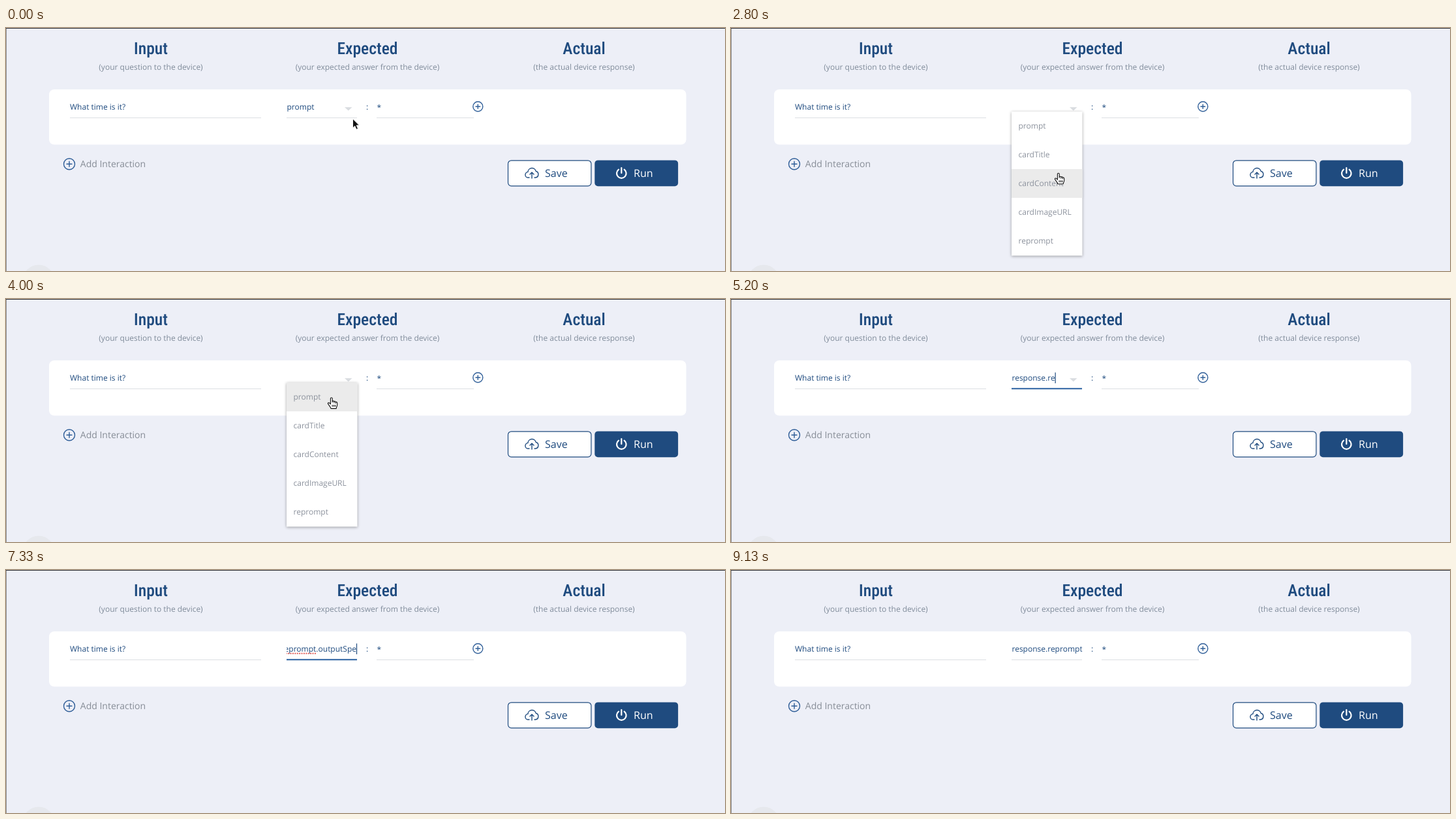
Recreate the animation shown at these times as an HTML page. Size 1102 by 372 pixels, loop 10 s.

```html
<!DOCTYPE html>
<html lang="en">
<head>
<meta charset="utf-8">
<style>
  html, body { margin: 0; height: 100%; overflow: hidden; background: #edeff7; }
  svg { display: block; font: 12px "Open Sans", "Noto Sans", sans-serif; fill: #1f4b7f; text-rendering: geometricPrecision; }
  .head {
    font: 500 25.5px "Noto Sans ExtraCondensed", "Roboto Condensed", "Liberation Sans Narrow", "Noto Sans", sans-serif;
    font-stretch: extra-condensed;
  }
  .mid { text-anchor: middle; }
  .grey { fill: #808c9b; }
  .icon { fill: none; stroke: #1f4b7f; stroke-width: 1.4; stroke-linecap: round; stroke-linejoin: round; }
  .plus { stroke: #2f5e98; }
  .rule { stroke: #dcdfe3; }
  #panel { filter: drop-shadow(0 1px 2px rgba(0, 0, 0, .36)); }
  #options { fill: #8c929d; }
</style>
</head>
<body>
<svg width="1102" height="372" viewBox="0 0 1102 372">
  <defs><clipPath id="field"><path d="M430 108h108.5v30H430z"/></clipPath></defs>
  <path fill="#8b8d93" d="M0 0h1v372H0z"/>
  <path fill="#303238" d="M0 0h1102v1H0z"/>
  <circle cx="50" cy="386.5" r="24" fill="#e6e8ed"/>

  <g class="mid">
    <g class="head"><text x="222" y="40">Input</text><text x="554" y="40">Expected</text><text x="886" y="40">Actual</text></g>
    <g class="grey">
      <text x="222" y="64">(your question to the device)</text>
      <text x="554" y="64">(your expected answer from the device)</text>
      <text x="886" y="64">(the actual device response)</text>
    </g>
  </g>

  <rect x="66" y="94" width="976.5" height="84.5" rx="8" fill="#fff"/>
  <path class="rule" d="M98 137.5H391M430 137.5H538M568 137.5H717"/>
  <text x="98" y="125">What time is it?</text>
  <text x="552" y="125">:</text>
  <text x="568.5" y="126">*</text>
  <path class="icon plus" d="M715.8 120.3a7.5 7.5 0 1 0 15 0a7.5 7.5 0 1 0-15 0M720 120.3h6.6M723.3 117v6.6"/>

  <path class="icon plus" d="M88.5 208.3a8.5 8.5 0 1 0 17 0a8.5 8.5 0 1 0-17 0M93 208.3h8M97 204.3v8"/>
  <text x="113.8" y="213.2" font-size="14" fill="#878d97">Add Interaction</text>

  <rect x="769.5" y="202.8" width="127.4" height="39" rx="5" fill="#fff" stroke="#1f4b7f" stroke-width="1.2"/>
  <path class="icon" d="M802 229h-1.5a4.3 4.3 0 0 1-.6-8.6a6.2 6.2 0 0 1 12.2-1.2a5 5 0 0 1-.6 9.8H810M806 230v-8.6M803 224l3-3 3 3"/>
  <text x="826" y="228.4" font-size="16">Save</text>
  <rect x="902.3" y="202.4" width="127.8" height="39.8" rx="5"/>
  <path fill="none" stroke="#fff" stroke-width="2.2" stroke-linecap="round" d="M939 216.6a7.3 7.3 0 1 0 8.6 0M943.3 214v8"/>
  <text x="962" y="228.4" font-size="16" fill="#fff">Run</text>

  <path id="arrow" fill="#d9dce0" d="M519 121.3h11.5l-5.75 5.2z"/>
  <g clip-path="url(#field)">
    <text id="value" y="125"></text>
    <path id="spelling" fill="none" stroke="#e2615c" stroke-width="2" stroke-dasharray="2 1.4"/>
  </g>
  <path id="focus" stroke="#2a60a0" stroke-width="2"/>
  <g id="panel">
    <rect id="sheet" x="430" y="128" width="108.5" fill="#fff"/>
    <rect id="hover" x="430" width="108.5" height="44" fill="#ebebeb"/>
    <g id="options"></g>
  </g>
  <path id="caret" fill="none" stroke="#1f4b7f" stroke-width="1.2"/>
  <path id="pointer" stroke-linejoin="round"/>
</svg>
<script>
const $ = id => document.getElementById(id);
const set = (id, attrs) => { for (const k in attrs) $(id).setAttribute(k, attrs[k]); };
const show = (id, on) => set(id, { visibility: on ? 'visible' : 'hidden' });
const clamp01 = x => Math.min(1, Math.max(0, x));
const pen = document.createElement('canvas').getContext('2d');
const width = text => {
  pen.font = '12px "Open Sans", "Noto Sans", sans-serif';
  pen.textRendering = 'geometricPrecision';
  return pen.measureText(text).width;
};

const OPTIONS = ['prompt', 'cardTitle', 'cardContent', 'cardImageURL', 'reprompt'];
const ROW = 44, LIST_TOP = 128, FIELD_LEFT = 430.5, FIELD_WIDTH = 106.5;
const FOCUS = 470, BLUR = 8870;
const DELETIONS = [1070, 1270, 1370, 1470, 1570, 1730];
// start, time per key, keys
const TYPING = [
  [4200, 100, 'response.re'], [5270, 130, 'pro'], [5670, 200, 'mpt'], [6470, 87, '.out'],
  [6930, 80, 'putSpeech'], [8070, 100, '.'], [8270, 87, 'ssml']
];
// first and last letter of a marked word, time of the mark
const MISSPELT = [[9, 17, 6200], [18, 30, 8130], [31, 35, 8670]];
const CARET_OFF = [[1930, 2270], [2730, 3270], [3530, 3730], [4000, 4200], [6200, 6470], [7870, 8070]];

const SHAPES = {
  arrow: { d: 'M0 0V14L3.2 11 5.5 16.3 8 15.2 5.7 10H10Z', fill: '#111', stroke: '#fff', 'stroke-width': .9 },
  beam: { d: 'M-3-8Q0-8 0-6Q0-8 3-8M0-6V6M-3 8Q0 8 0 6Q0 8 3 8', fill: 'none', stroke: '#222', 'stroke-width': 1.2 },
  hand: {
    d: 'M-1.6 10V1.4A1.4 1.4 0 0 1 1.2 1.4V7V6C1.4 4.8 3.8 4.8 3.9 6.2V8V6.2C4.3 5.3 6.3 5.5 6.4 7V8.5V7' +
       'C7 6.2 8.7 6.6 8.7 8.2V11C8.7 13 7.4 14 7.2 16.6H-1C-1.5 14-4.5 11.5-5.5 9.3C-6 7.8-4 7.3-3 8.4Z' +
       'M1.2 11v3M3.5 11v3M5.7 11v3',
    fill: '#fff', stroke: '#111', 'stroke-width': 1.1
  }
};
// time, x, y, shape
const POINTER = [
  [0, 531.5, 139, 'arrow'], [70, 531.5, 139, 'arrow'], [200, 524, 129, 'hand'], [270, 522.5, 126.5, 'hand'],
  [530, 522.5, 126.5, 'beam'], [670, 514, 122, 'beam'], [1070, 514, 122, ''],
  [2200, 512, 136, 'hand'], [2800, 502, 222, 'hand'], [3200, 502, 301, 'hand'], [3330, 502, 318, 'hand'],
  [3430, 502, 318, 'hand'], [3800, 499, 151, 'hand'], [4200, 499, 151, '']
];

function valueAt(t) {
  if (t < TYPING[0][0]) return 'prompt'.slice(0, 6 - DELETIONS.filter(d => t >= d).length);
  return TYPING.map(([start, step, keys]) =>
    keys.slice(0, Math.max(0, Math.floor((t - start) / step) + 1))).join('');
}

function pointerAt(t) {
  const i = POINTER.findLastIndex(p => t >= p[0]);
  const [time, x, y, shape] = POINTER[i], next = POINTER[i + 1];
  if (!next || !shape) return { x, y, shape };
  const k = (t - time) / (next[0] - time);
  return { x: x + (next[1] - x) * k, y: y + (next[2] - y) * k, shape };
}

function drawField(t, text, focused) {
  const scroll = focused ? Math.max(0, width(text) - FIELD_WIDTH) : 0;
  const xAt = n => FIELD_LEFT - scroll + width(text.slice(0, n));
  $('value').textContent = text;
  set('value', { x: FIELD_LEFT - scroll });
  show('arrow', text.length < 15);

  const marks = focused ? MISSPELT.filter(m => t >= m[2]) : [];
  set('spelling', { d: marks.map(([a, b]) => `M${xAt(a)} 127.7H${xAt(b)}`).join('') });

  const x = xAt(text.length) + .5;
  set('caret', { d: `M${x} 112.5V129` });
  show('caret', focused && !CARET_OFF.some(([a, b]) => t >= a && t < b));

  const half = 54 * clamp01((t - FOCUS) / 330) * clamp01((9130 - t) / (9130 - BLUR));
  set('focus', { d: `M${484 - half} 137.3H${484 + half}` });
  show('focus', half > 0);
}

function drawList(t, text, focused, pointer) {
  const rows = focused ? OPTIONS.filter(o => o.includes(text)) : [];
  const row = Math.floor((pointer.y - LIST_TOP) / ROW);
  const hovered = pointer.shape === 'hand' && row >= 0 && row < rows.length;
  set('panel', { opacity: clamp01((t - FOCUS) / 260) });
  show('panel', rows.length);
  set('sheet', { height: ROW * rows.length + .5 });
  set('hover', { y: LIST_TOP + ROW * row, opacity: hovered ? 1 : 0 });
  const markup = rows.map((o, i) => `<text x="440.5" y="${154 + ROW * i}">${o}</text>`).join('');
  if ($('options').dataset.markup !== markup) {
    $('options').innerHTML = $('options').dataset.markup = markup;
  }
}

function frame() {
  const t = performance.now() % 10000;
  const text = valueAt(t), focused = t >= FOCUS && t < BLUR, pointer = pointerAt(t);
  drawField(t, text, focused);
  drawList(t, text, focused, pointer);
  show('pointer', pointer.shape);
  if (pointer.shape) {
    set('pointer', { ...SHAPES[pointer.shape], transform: `translate(${pointer.x} ${pointer.y})` });
  }
  requestAnimationFrame(frame);
}
frame();
</script>
</body>
</html>
```
